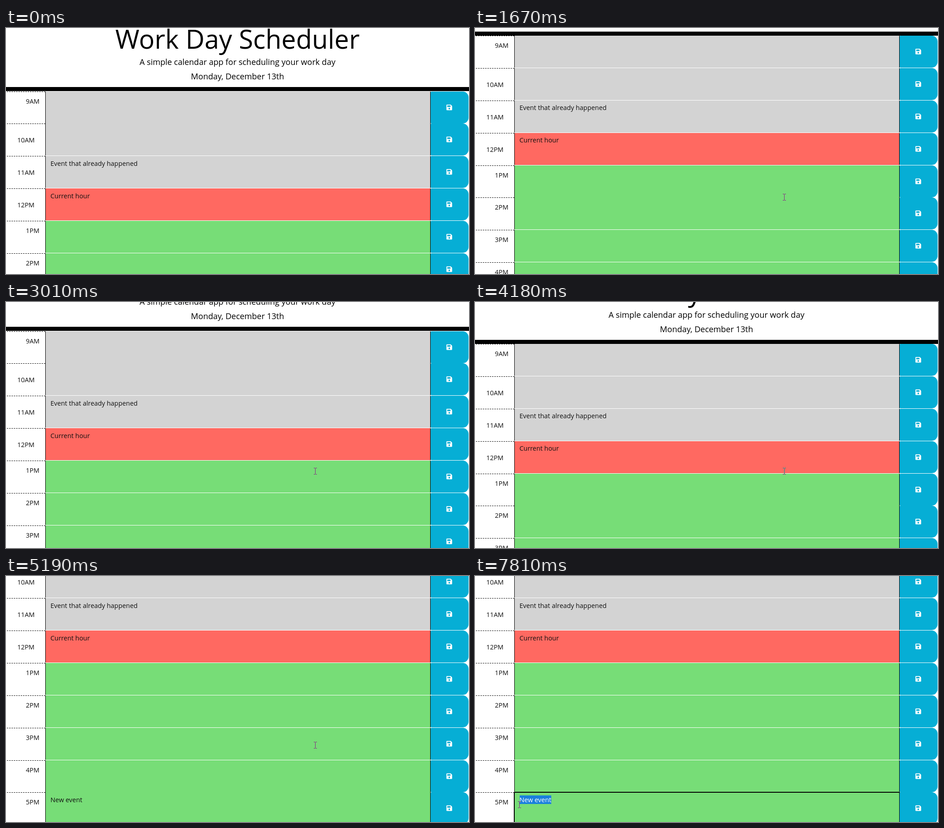
An HTML page for the animation above (8 s loop, 1026 by 546 pixels).

```html
<!DOCTYPE html>
<html lang="en">
<head>
<meta charset="utf-8">
<title>Work Day Scheduler</title>
<style>
  html, body { margin: 0; width: 100%; height: 100%; overflow: hidden; background: #fff; }
  #stage {
    position: relative; width: 1026px; height: 546px; overflow: hidden; background: #fff;
    font: 14.4px/20px "Open Sans", sans-serif; color: #000;
  }
  #stage * { box-sizing: border-box; }
  #page { position: absolute; left: 0; top: 0; width: 1026px; height: 800px; }
  header div { position: absolute; width: 100%; text-align: center; white-space: nowrap; }
  .title { top: -16px; font-size: 57.6px; line-height: 80px; }
  .lead { font-size: 18px; line-height: 26px; }
  .bar { top: 131px; height: 9px; background: #000; }
  .row { position: absolute; left: 0; width: 1026px; height: 71.85px; }
  .row > * { position: absolute; }
  .hour { left: 2px; top: 0; width: 85px; height: 70px; border-top: 1px dashed #000; color: #111; }
  .hour span { position: absolute; left: 42px; top: 11px; }
  .hour.wide span { left: 23px; top: 26px; }
  .slot {
    left: 87px; top: 0; width: 854px; height: 71px; padding: 6.5px 10.5px;
    border: solid #000; border-width: 0 1px; color: #111; white-space: pre;
  }
  .past { background: #d3d3d3; }
  .present { background: #ff6961; }
  .future { background: #77dd77; }
  .focus { outline: 2px solid #000; outline-offset: -1px; border-radius: 2px; }
  .sel { background: #1a80dd; color: #fff; }
  .save { left: 941px; top: 0; width: 84px; height: 71px; background: #06aed5; border-radius: 2px 13px 13px 2px; }
  .save svg { position: absolute; left: 35px; top: 28px; width: 12.6px; height: 14.4px; fill: #fff; }
  #cursor { position: absolute; left: 0; top: 0; width: 7px; height: 15px; mix-blend-mode: difference; }
</style>
</head>
<body>
<div id="stage">
  <div id="page">
    <header>
      <div class="title">Work Day Scheduler</div>
      <div class="lead" style="top:62px">A simple calendar app for scheduling your work day</div>
      <div class="lead" style="top:94px">Monday, December 13th</div>
      <div class="bar"></div>
    </header>
  </div>
  <svg id="cursor" viewBox="0 0 7 15" fill="none" stroke="#fff">
    <path d="M0 .5h3m1 0h3M0 14.5h3m1 0h3M3.5 1v13"/>
  </svg>
</div>
<script>
const LOOP = 8000, ROW = 71.85, FIRST = 140.6;
const hours = ['9AM', '10AM', '11AM', '12PM', '1PM', '2PM', '3PM', '4PM', '5PM'];
const events = { '11AM': 'Event that already happened', '12PM': 'Current hour', '5PM': 'New event' };
const disk = 'M434 130L350 46a48 48 0 0 0-34-14H48a48 48 0 0 0-48 48v352a48 48 0 0 0 48 48h352' +
  'a48 48 0 0 0 48-48V164a48 48 0 0 0-14-34zM224 416a64 64 0 1 1 0-128 64 64 0 0 1 0 128z' +
  'm96-304v100a12 12 0 0 1-12 12H76a12 12 0 0 1-12-12V108a12 12 0 0 1 12-12h229z';

const page = document.getElementById('page');
const cursor = document.getElementById('cursor');

hours.forEach((hour, i) => {
  const state = i < 3 ? 'past' : i === 3 ? 'present' : 'future';
  const row = document.createElement('div');
  row.className = 'row';
  row.style.top = FIRST + i * ROW + 'px';
  row.innerHTML =
    `<div class="hour ${hour.length > 3 ? 'wide' : ''}"><span>${hour}</span></div>` +
    `<div class="slot ${state}">${events[hour] || ''}</div>` +
    `<div class="save"><svg viewBox="0 0 448 512"><path fill-rule="evenodd" d="${disk}"/></svg></div>`;
  page.append(row);
});
const slot = page.lastElementChild.querySelector('.slot');

// Each key: time, number of equal jumps from the previous key, values reached.
const scroll = [
  [0, 1, 0], [1040, 1, 12], [1190, 2, 50], [1820, 8, 148], [1900, 1, 163], [2230, 4, 230.6], [2460, 3, 235],
  [2840, 1, 215], [3010, 2, 76], [3160, 2, 0],
  [3790, 1, 5], [4180, 5, 47.4], [4560, 5, 100], [4650, 1, 118], [4730, 1, 142], [4960, 1, 175], [5190, 3, 235]
];
const pointer = [
  [0, 1, -50, -50], [310, 1, 864, 447], [640, 4, 685, 375],
  [5740, 1, 655, 402], [6350, 8, 228, 528], [6520, 1, 229, 510],
  [7040, 1, 185, 508], [7200, 2, 103, 506], [7430, 1, 92, 508], [7510, 1, 87, 509],
  [7660, 1, 90, 507], [7810, 2, 98, 507]
];
const selection = [[0, 1, 9], [7120, 1, 5], [7200, 1, 0]];

function at(track, t) {
  let i = track.length - 1;
  while (i > 0 && track[i][0] > t) i--;
  const [t0, , ...from] = track[i];
  const next = track[i + 1];
  if (!next) return from;
  const [t1, jumps, ...to] = next;
  const k = Math.floor((t - t0) / (t1 - t0) * jumps + 1e-6) / jumps;
  return from.map((v, j) => v + (to[j] - v) * k);
}

let shown = -1;
function select(start) {
  if (start === shown) return;
  shown = start;
  const text = events['5PM'];
  slot.textContent = text.slice(0, start);
  if (start < text.length) {
    const mark = document.createElement('span');
    mark.className = 'sel';
    mark.textContent = text.slice(start);
    slot.append(mark);
  }
}

function draw(t) {
  page.style.top = -at(scroll, t)[0] + 'px';
  const [x, y] = at(pointer, t).map(Math.round);
  cursor.style.left = x - 3 + 'px';
  cursor.style.top = y - 7 + 'px';
  slot.classList.toggle('focus', t >= 6520);
  select(at(selection, t)[0]);
}

const begin = performance.now();
function tick() {
  draw((performance.now() - begin) % LOOP);
  requestAnimationFrame(tick);
}
tick();
</script>
</body>
</html>
```
